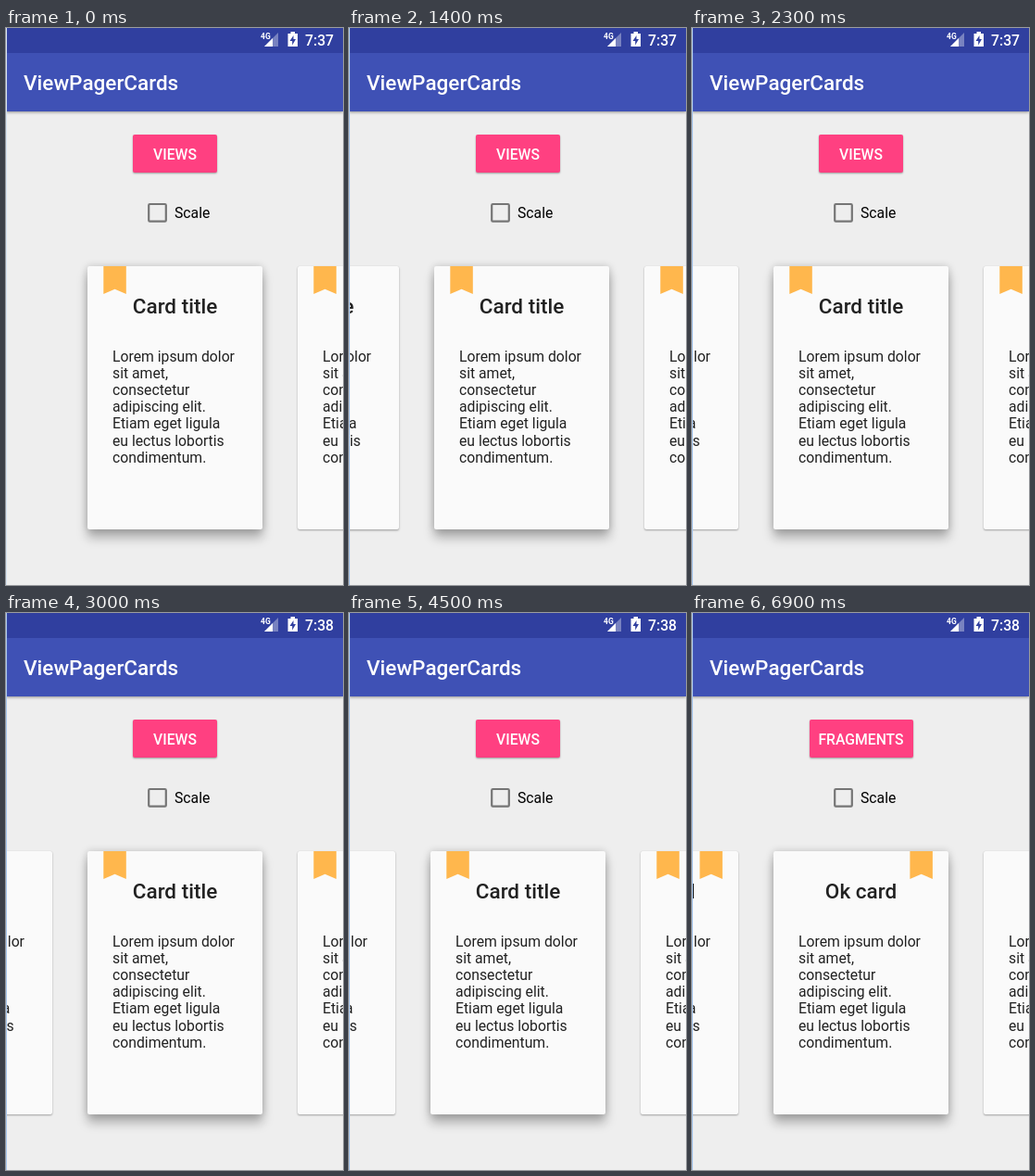
Animation of 364x601 px, one loop 8 s. Source, as an HTML page:

```html
<!DOCTYPE html>
<html lang="en">
<head>
<meta charset="utf-8">
<title>ViewPagerCards</title>
<style>
  html, body { margin: 0; width: 100%; height: 100%; overflow: hidden; background: #eee; }
  #stage { position: relative; width: 364px; height: 601px; overflow: hidden; background: #eee; }
  svg { position: absolute; left: 0; top: 0; overflow: visible; }
  text { font: 15.75px Roboto, sans-serif; fill: #212121; }
  .medium { font-weight: 500; }
  .large { font-size: 22.5px; font-weight: 500; }
  .white { fill: #fff; }
  .mid { text-anchor: middle; }
  #appbar { position: absolute; width: 364px; height: 90px; background: #3f51b5;
    box-shadow: 0 1px 3px rgba(0,0,0,.4); }
  #statusbar { height: 27px; background: #303f9f; }
  #button { position: absolute; top: 115px; height: 41px; border-radius: 2px; background: #ff4081;
    box-shadow: 0 1px 2px rgba(0,0,0,.35); }
  .card { position: absolute; left: 88px; top: 257px; width: 189px; height: 284px;
    border-radius: 2px; background: #fafafa; }
  #edge { position: absolute; left: 0; top: 0; width: 1px; height: 601px; }
</style>
</head>
<body>
<div id="stage">
  <div id="appbar"><div id="statusbar"></div></div>
  <div id="button"></div>
  <svg width="364" height="601">
    <text class="large white" x="19" y="67">ViewPagerCards</text>
    <text class="medium white" id="clock" x="323" y="18.5"></text>
    <path d="M279 20L294 5V20Z" fill="#fff" opacity=".35"/>
    <path d="M279 20L288 11V20Z" fill="#fff"/>
    <text class="white" x="275" y="11.5" style="font-size:8.5px;font-weight:700" textLength="auto">4G</text>
    <path d="M304.5 6H307.5V4H312V6H315V20H304.5Z" fill="#fff"/>
    <path d="M310.5 8L306.5 14H309.2V18.5L313 12H310.5Z" fill="#303f9f"/>
    <text class="medium white mid" id="buttonLabel" x="182.5" y="141.7"></text>
    <rect x="154.2" y="190" width="18.6" height="18.6" rx="1.2" fill="none" stroke="#757575" stroke-width="2.2"/>
    <text x="182" y="205" style="fill:#000">Scale</text>
  </svg>
  <div id="views"></div>
  <div id="fragments"></div>
  <div id="edge"></div>
</div>
<script>
const LOOP = 8000, STEP = 100, PITCH = 227, SWITCH = 5300;
const BODY = ["Lorem ipsum dolor", "sit amet,", "consectetur", "adipiscing elit.",
  "Etiam eget ligula", "eu lectus lobortis", "condimentum."];
const $ = id => document.getElementById(id);

// Distance travelled, in pixels, at each step of a swipe
const viewSwipes = [
  { start: 1100, path: [20, 120, 202, 223, 226, 227] },
  { start: 1900, path: [27, 135, 208, 225, 227] },
  { start: 2800, path: [70, 216, 227] },
  { start: 3600, path: [70, 216, 227] },
  { start: 4300, path: [70, 216, 227] }
];
const fragmentSwipes = [{ start: 6500, path: [27, 135, 208, 225, 227] }];

function makePager(id, titles, bookmarkX) {
  const root = $(id);
  const cards = titles.map(title => {
    const card = document.createElement("div");
    card.className = "card";
    const lines = BODY.map((line, i) =>
      `<text x="27" y="${102.8 + i * 18.15}">${line}</text>`).join("");
    card.innerHTML = `<svg width="189" height="284">
      <path d="M${bookmarkX} 0h24.5v30l-12.25 -5.3l-12.25 5.3z" fill="#ffb74d"/>
      <text class="large mid" x="94.5" y="51">${title}</text>${lines}</svg>`;
    root.append(card);
    return card;
  });
  return { root, cards };
}

const views = makePager("views", Array(7).fill("Card title"), 17.3);
const fragments = makePager("fragments", ["Cool card", "Ok card", "Ok card"], 147.4);

function scrollAt(swipes, time) {
  return swipes.reduce((sum, { start, path }) => {
    const step = Math.floor((time - start) / STEP);
    return sum + (step < 0 ? 0 : path[Math.min(step, path.length - 1)]);
  }, 0);
}

function drawPager({ root, cards }, scroll, visible) {
  root.style.display = visible ? "block" : "none";
  cards.forEach((card, i) => {
    const x = i * PITCH - scroll;
    const lift = Math.max(0, 1 - Math.abs(x) / PITCH);
    card.style.transform = `translateX(${x}px)`;
    card.style.boxShadow =
      `0 ${1 + 8 * lift}px ${2 + 10 * lift}px rgba(0,0,0,${.32 - .04 * lift}),` +
      `0 0 ${1 + 8 * lift}px rgba(0,0,0,${.1 + .08 * lift})`;
  });
}

function draw(now) {
  const time = now % LOOP;
  const switched = time >= SWITCH;
  const pressed = switched && time < SWITCH + STEP;
  const width = switched ? 112 : 91;
  $("button").style.left = 182.5 - width / 2 + "px";
  $("button").style.width = width + "px";
  $("button").style.background = pressed ? "#ff5590" : "#ff4081";
  $("buttonLabel").textContent = switched ? "FRAGMENTS" : "VIEWS";
  $("clock").textContent = time < 2900 ? "7:37" : "7:38";
  $("edge").style.background = time < 900 ? "#d6e3f2" : "#a9c8ee";
  drawPager(views, scrollAt(viewSwipes, time), !switched);
  drawPager(fragments, scrollAt(fragmentSwipes, time), switched);
}

const begin = performance.now();
function tick() {
  draw(performance.now() - begin);
  requestAnimationFrame(tick);
}
tick();
</script>
</body>
</html>
```
